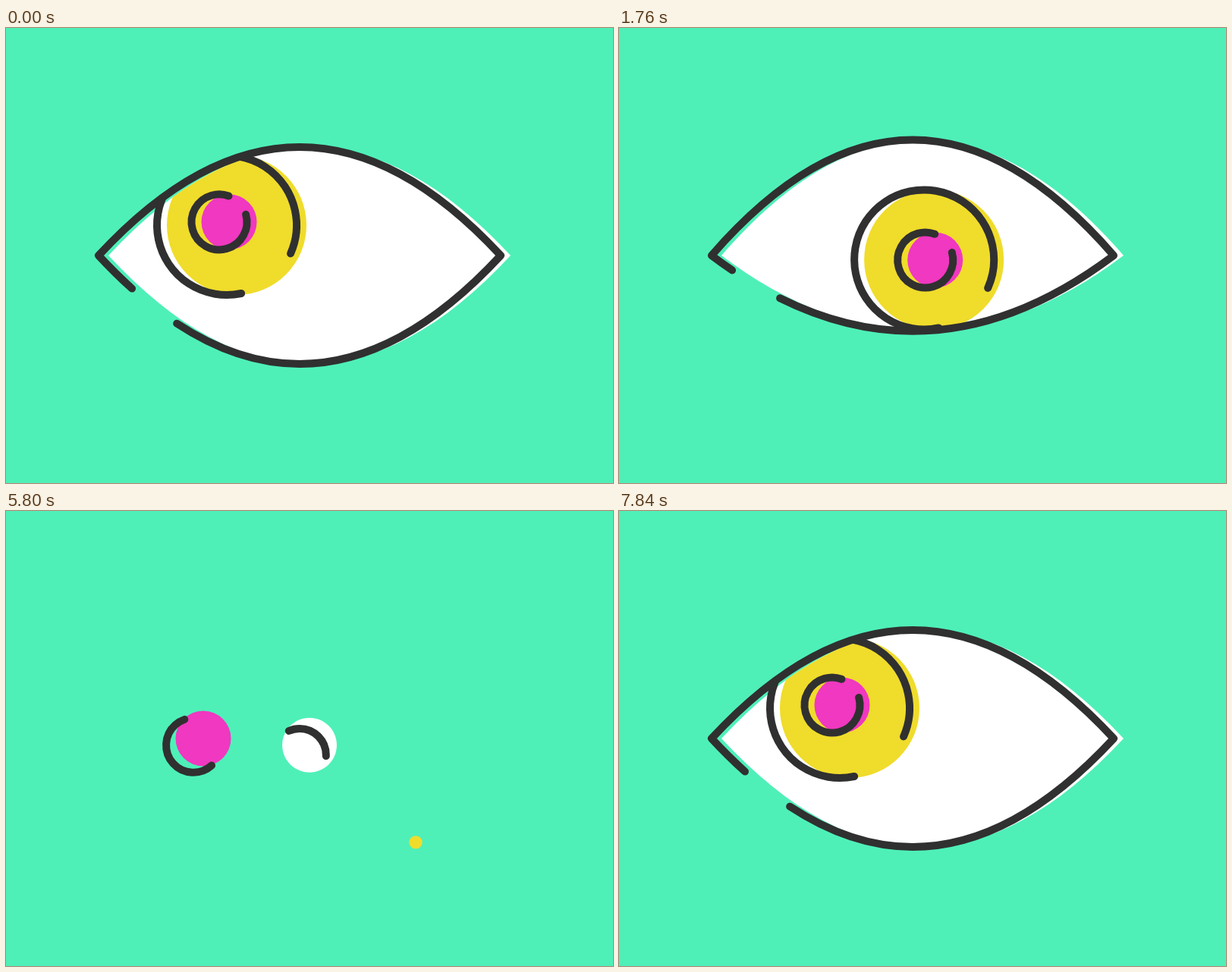
Recreate the animation shown at these times as an HTML page with a canvas. Size 800 by 600 pixels, loop 8 s.

```html
<!DOCTYPE html>
<html lang="en">
<head>
<meta charset="utf-8">
<title>Eye</title>
<style>
html, body { margin: 0; width: 100%; height: 100%; overflow: hidden; background: #4ef0b8; }
canvas { display: block; }
</style>
</head>
<body>
<canvas id="stage" width="800" height="600"></canvas>
<script>
const LOOP = 8000, INK = '#303030', WHITE = '#fff', YELLOW = '#f0dc2b', PINK = '#f038c0';
const SHIFT = -13; // outlines sit left of their fills
const ctx = document.getElementById('stage').getContext('2d');

const clamp = p => Math.min(1, Math.max(0, p));
const lerp = (a, b, p) => a + (b - a) * p;
const linear = p => p;
const sine = p => (1 - Math.cos(Math.PI * p)) / 2;
const quadIn = p => p * p;
const quad = p => p < .5 ? 2 * p * p : 1 - 2 * (1 - p) ** 2;
const cubic = p => p < .5 ? 4 * p ** 3 : 1 - 4 * (1 - p) ** 3;
const span = (t, from, to) => clamp((t - from) / (to - from));

// keys: [time, value, ease used to reach it]
function track(t, keys, ease = sine) {
  if (t <= keys[0][0]) return keys[0][1];
  for (let i = 1; i < keys.length; i++) {
    const [t0, v0] = keys[i - 1], [t1, v1, e = ease] = keys[i];
    if (t <= t1) return lerp(v0, v1, e((t - t0) / (t1 - t0)));
  }
  return keys[keys.length - 1][1];
}

// Closed outline, clockwise from the right end; morph 0 = ellipse, 1 = two parabolas
function lensCurves({ x, y, w, up, low, morph }) {
  const cx = lerp(1, 2 / 3, morph), cy = lerp(.5523, 2 / 3, morph), k = lerp(.5523, 1 / 3, morph);
  const at = (a, b) => [x + a * w, y + b * (b > 0 ? low : up)];
  return [
    [at(1, 0), at(cx, cy), at(k, 1), at(0, 1)],
    [at(0, 1), at(-k, 1), at(-cx, cy), at(-1, 0)],
    [at(-1, 0), at(-cx, -cy), at(-k, -1), at(0, -1)],
    [at(0, -1), at(k, -1), at(cx, -cy), at(1, 0)]
  ];
}

function lensPath(lens) {
  const path = new Path2D(), curves = lensCurves(lens);
  path.moveTo(...curves[0][0]);
  for (const [, a, b, c] of curves) path.bezierCurveTo(...a, ...b, ...c);
  path.closePath();
  return path;
}

function lensLength(lens) {
  let sum = 0;
  for (const c of lensCurves(lens)) {
    let last = c[0];
    for (let i = 1; i <= 40; i++) {
      const p = i / 40, q = 1 - p;
      const now = [0, 1].map(d => q ** 3 * c[0][d] + 3 * q * q * p * c[1][d] + 3 * q * p * p * c[2][d] + p ** 3 * c[3][d]);
      sum += Math.hypot(now[0] - last[0], now[1] - last[1]);
      last = now;
    }
  }
  return sum;
}

function strokeLens(lens, from, to) {
  if (to <= from || lens.w < 1) return;
  const total = lensLength(lens);
  ctx.setLineDash([total * (to - from), total * (1 - to + from)]);
  ctx.lineDashOffset = -from * total;
  ctx.stroke(lensPath(lens));
  ctx.setLineDash([]);
}

function clipped(path, draw) {
  ctx.save();
  if (path) ctx.clip(path);
  draw();
  ctx.restore();
}

function disc(x, y, r, color) {
  ctx.fillStyle = color;
  ctx.beginPath();
  ctx.arc(x, y, Math.max(0, r), 0, 7);
  ctx.fill();
}

function arc(x, y, r, from, to) {
  if (r < 1 || to <= from) return;
  ctx.beginPath();
  ctx.arc(x, y, r, from * Math.PI / 180, to * Math.PI / 180);
  ctx.stroke();
}

// A ball that rises into its row while it grows
function rise(t, start, time = 470) {
  const p = span(t, start, start + time);
  return { y: 440 - 140 * quad(p), size: 1 - (1 - p) ** 2.4 };
}

function ballRow(t) {
  const grow = cubic(span(t, 6600, 7300));
  const settle = 30 * sine(span(t, 7380, 7840));
  const lens = (x, { y, size }) => {
    const h = lerp(36.5, 173, grow) * size - settle;
    return { x, y, w: lerp(36.5, 265, grow) * size, up: h, low: h, morph: grow };
  };
  const pink = rise(t, 5150), pinkLine = rise(t, 5250, 670);
  const yellow = rise(t, 5752), yellowLine = rise(t, 5800);
  const look = sine(span(t, 7200, 7840));
  const big = track(t, [[6740, 37.3], [7260, 92]]);
  return {
    fill: lens(400, rise(t, 5414)),
    line: lens(400 + SHIFT, rise(t, 5462)),
    iris: {
      x: track(t, [[6490, 540], [7200, 400]]) - 96 * look,
      y: yellow.y - 40 * look, r: big * yellow.size,
      lineY: yellowLine.y - 40 * look, lineR: big * yellowLine.size,
      from: track(t, [[5800, -100], [6760, 9], [7800, 78]]),
      to: track(t, [[5800, -100], [6760, 315], [7800, 384]])
    },
    pupil: {
      x: track(t, [[6400, 260], [7100, 400]]) - 106 * look,
      y: pink.y - 44 * look, r: 36.5 * pink.size,
      lineY: pinkLine.y - 44 * look, lineR: 36.5 * pinkLine.size,
      from: track(t, [[5250, 20], [5800, 48], [6760, 230], [7800, 344]]),
      to: track(t, [[5250, 20], [5800, 251], [6760, 534], [7800, 650]])
    }
  };
}

function openEye(t) {
  const up = track(t, [[80, 143], [720, 167], [1120, 167], [1240, 169], [1940, 139, quadIn], [2520, 16.5, linear], [2620, 0, linear]]);
  const low = track(t, [[80, 143], [720, 167], [1120, 167], [1240, 166], [1940, 77, linear], [2520, 9, linear], [2620, 0, linear]]);
  const dx = track(t, [[60, -96], [720, 35], [1120, 35], [2300, 0]]);
  const dy = track(t, [[60, -40], [720, 12.6], [1120, 12.6], [2300, 0]]);
  const lens = x => ({ x, y: 300, w: 265, up, low, morph: 1 });
  const part = (k, r, from) => ({
    x: 400 + k * dx, y: 300 + k * dy, r, lineY: 300 + k * dy, lineR: r, from, to: from + 306
  });
  return { fill: lens(400), line: lens(400 + SHIFT), iris: part(1, 92, 78), pupil: part(1.104, 36.5, 344) };
}

function lidTrim(t) {
  if (t < 4000) return [
    track(t, [[2440, .45], [2520, .5], [2880, .765]], linear),
    track(t, [[1900, 1.3895], [2520, 1.007], [2880, .765]], linear)
  ];
  return [
    track(t, [[5480, -.318], [5800, -.318], [6760, .214], [7840, .45]]),
    track(t, [[5480, -.318], [5800, .0055], [6760, 1.067], [7840, 1.3895]])
  ];
}

function drawPart(part, color, fillClip, lineClip) {
  clipped(fillClip, () => disc(part.x, part.y, part.r, color));
  clipped(lineClip, () => arc(part.x + SHIFT, part.lineY, part.lineR, part.from, part.to));
}

function drawLastBall(t) {
  const radius = time => track(time, [[2880, 0], [3220, 38], [3600, 52], [4000, 0]]);
  if (t < 2880 || t >= 4000) return;
  disc(400, 298, radius(t), PINK);
  arc(400 + SHIFT, 298, radius(t), 344, 344 + 306 * sine(span(t, 2900, 3400)));
}

function draw(t) {
  ctx.fillStyle = '#4ef0b8';
  ctx.fillRect(0, 0, 800, 600);
  ctx.strokeStyle = INK;
  ctx.lineWidth = 10;
  ctx.lineCap = ctx.lineJoin = 'round';
  if (t >= 4000 && t < 5150) return;

  const eye = t < 4000 ? openEye(t) : ballRow(t);
  const inside = t < 4000 || t > 7050;
  const lid = () => strokeLens(eye.line, ...lidTrim(t));
  if (t > 4000 || t < 2620) {
    const fillPath = lensPath(eye.fill);
    ctx.fillStyle = WHITE;
    ctx.fill(fillPath);
    if (!inside) lid();
    const clips = inside ? [fillPath, lensPath(eye.line)] : [];
    drawPart(eye.iris, YELLOW, ...clips);
    drawPart(eye.pupil, PINK, ...clips);
  }
  if (inside) lid();
  drawLastBall(t);
}

const begin = performance.now();
function frame() {
  draw((performance.now() - begin) % LOOP);
  requestAnimationFrame(frame);
}
frame();
</script>
</body>
</html>
```
